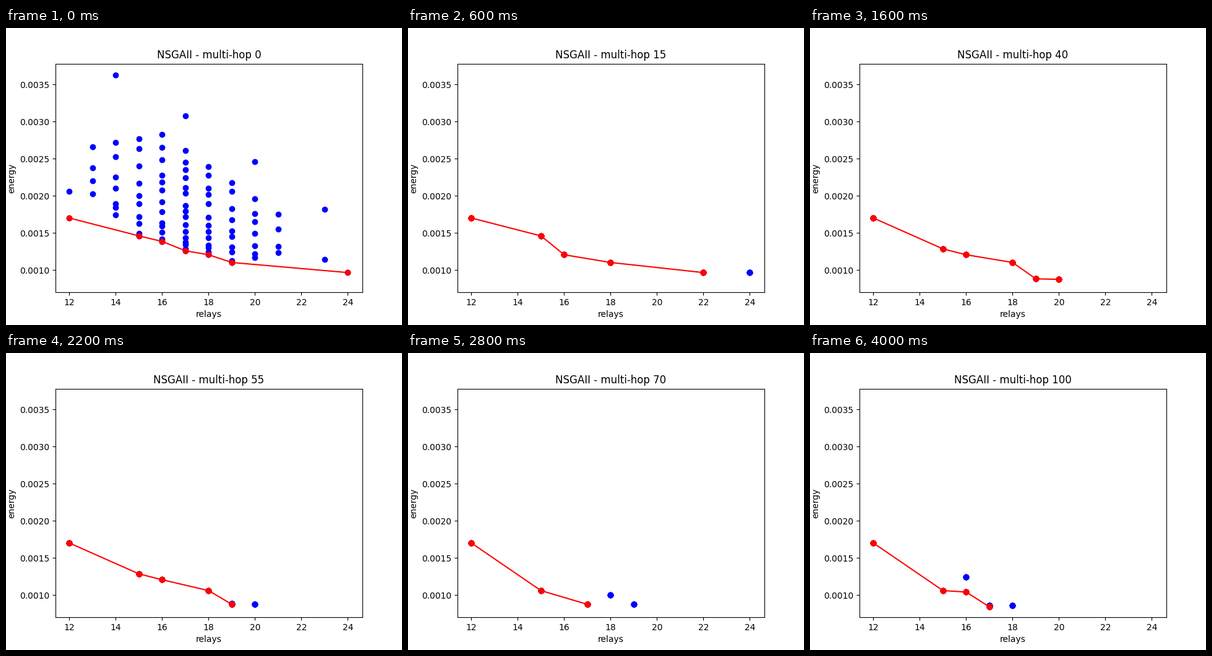
A matplotlib script for the animation above (4.2 s loop, 640 px wide and 480 px high).

```python
import matplotlib.pyplot as plt
import numpy as np
from matplotlib.animation import FuncAnimation

STEP = 5          # generations per animation step
LAST = 100
UNIT = 1e-5       # energies below are given in this unit
SURVIVAL = 111    # overtaken solutions above this energy vanish at once

FIRST_FRONT = [(12, 170.3), (15, 146.2), (16, 138.7), (17, 126.2),
               (18, 120.8), (19, 110.4), (24, 96.8)]
OUTLIERS = [(12, 206), (14, 363), (17, 308), (20, 246), (23, 182),
            (23, 114.6)]

# (generation, relays, energy) of each new solution
DISCOVERIES = [
    (5, 16, 120.8), (10, 18, 110.4), (15, 22, 96.8),
    *[(20 + STEP * k, 23 - k, 87.7) for k in range(4)],
    (30, 15, 128.7), (40, 19, 88.4), (50, 18, 106.2), (55, 19, 87.7),
    (65, 18, 100), (70, 15, 106.2), (70, 17, 87.7), (85, 16, 104.3),
    (90, 18, 86.3), (95, 17, 86.3),
    (100, 17, 84.3), (100, 18, 86.3), (100, 16, 124.5),
]


def random_population():
    """Columns fullest at 17 relays, densest just above the front."""
    rng = np.random.default_rng(4)
    edge_x, edge_e = zip((13, 203), *FIRST_FRONT[1:-1], (21, 124))
    points = FIRST_FRONT + OUTLIERS
    for x in range(13, 22):
        low = np.interp(x, edge_x, edge_e)
        high = np.interp(x, [13, 16, 21], [266, 283, 175])
        count = 16 - 3 * abs(x - 17)
        t = np.linspace(0, 1, count)
        t[1:-1] += rng.uniform(-0.4, 0.4, count - 2) / count
        points = points + [(x, e) for e in low + (high - low) * t ** 1.5]
    return points


def front_at(generation):
    """Solutions found so far that no other one beats."""
    known = set(FIRST_FRONT)
    known |= {(x, e) for g, x, e in DISCOVERIES if g <= generation}
    return sorted(p for p in known
                  if not any(q != p and q[0] <= p[0] and q[1] <= p[1]
                             for q in known))


def population_at(generation):
    if generation == 0:
        return random_population()
    front = front_at(generation)
    overtaken = [p for p in front_at(generation - STEP)
                 if p not in front and p[1] < SURVIVAL]
    found = [(x, e) for g, x, e in DISCOVERIES if g == generation]
    return front + overtaken + found


def place(line, points):
    line.set_data([x for x, _ in points], [e * UNIT for _, e in points])


fig, ax = plt.subplots(figsize=(6.4, 4.8), dpi=100)
ax.set(xlim=(11.402, 24.629), ylim=(70.2 * UNIT, 378.2 * UNIT),
       xlabel="relays", ylabel="energy")
title = ax.set_title("")
population, = ax.plot([], [], "bo")
front_line, = ax.plot([], [], "r-")
front_dots, = ax.plot([], [], "ro")


def draw(step):
    generation = step * STEP
    copies = 6 if generation else 1   # later generations hold duplicates
    front = front_at(generation)
    place(population, population_at(generation) * copies)
    place(front_line, front)
    place(front_dots, front * copies)
    title.set_text(f"NSGAII - multi-hop {generation}")
    return population, front_line, front_dots, title


animation = FuncAnimation(fig, draw, frames=LAST // STEP + 1, interval=200,
                          repeat=True, repeat_delay=0, blit=False)
plt.show()
```
